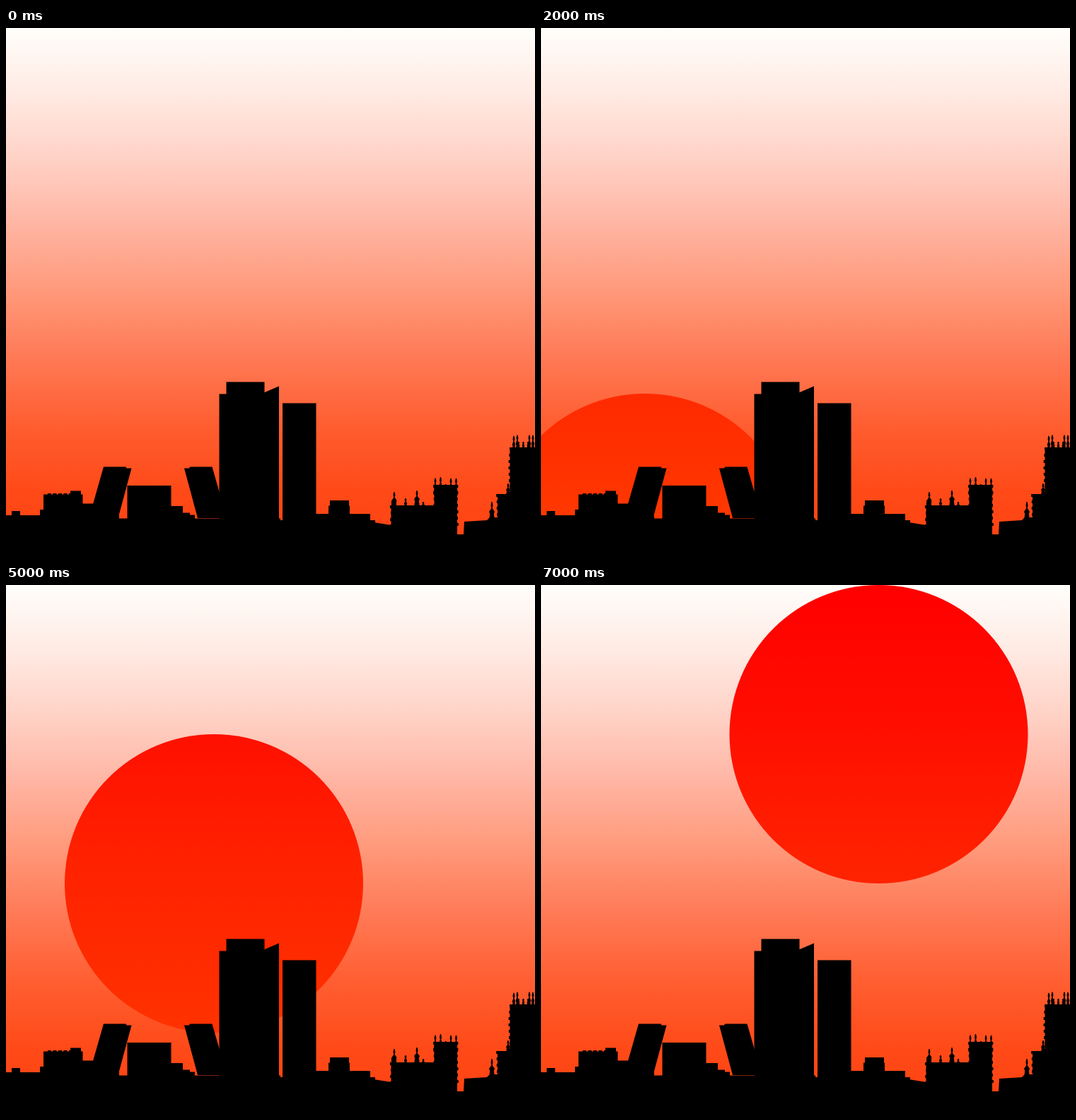
An HTML page with a canvas that plays this animation: 748x748 px, repeating every 8000 ms.

```html
<!DOCTYPE html>
<html lang="en">
<head>
<meta charset="utf-8">
<title>Sunrise over a skyline</title>
<style>
  html, body { margin: 0; height: 100%; overflow: hidden; }
  canvas { display: block; width: 100%; height: 100%; }
</style>
</head>
<body>
<canvas id="stage" width="748" height="748"></canvas>
<script>
  const SIZE = 748, RADIUS = 211;
  const ctx = document.getElementById('stage').getContext('2d');

  // Vertical gradient over the whole stage with evenly spaced colours
  function gradient(...colors) {
    const g = ctx.createLinearGradient(0, 0, 0, SIZE);
    colors.forEach((c, i) => g.addColorStop(i / (colors.length - 1), c));
    return g;
  }
  const sky = gradient('#fffefb', '#ffeae3', '#ffd1c5', '#ffb4a2', '#ff9879',
    '#ff7955', '#ff5e31', '#ff4a18', '#ff4010');
  const glow = gradient('#f00', '#ff0d00', '#ff2000', '#ff2d00', '#ff3c00');

  const noise = n => Math.abs(Math.sin(n * 12.9898) * 43758.5453) % 1;
  const box = (left, top, right, bottom = SIZE) =>
    ctx.fillRect(left, top, right - left, bottom - top);

  function poly(...points) {
    ctx.beginPath();
    points.forEach(p => ctx.lineTo(...p));
    ctx.fill();
  }

  // Tapered pinnacle with a knob near its tip
  function spire(x, top, height, w = 2.2) {
    const shape = [[.6, 0], [1.5, .18], [.7, .32], [w, .5], [w * .7, .6], [w, 1]];
    const side = dir => shape.map(([dx, k]) => [x + dir * dx, top + height * k]);
    poly(...side(1), ...side(-1).reverse());
  }

  // Stone block with small carved ledges along both sides
  function stone(left, top, right, bottom) {
    box(left, top, right, bottom);
    for (let y = top; y < bottom - 8; y += 9) {
      const ledge = 2 * noise(y);
      box(left - ledge, y, right + ledge, y + 4);
    }
  }

  // Four tall pinnacles in two pairs, with low ones between them
  function crown(left, right, top, gap) {
    for (const x of [left, left + gap, right - gap, right]) spire(x, top + noise(x) * 2, 24);
    for (let k = 1; k < 4; k++) spire(left + (right - left) * k / 4, top + 10, 10, 1.8);
  }

  function leaningTower(outer, dir) {
    const at = (dx, y) => [outer + dir * dx, y];
    poly(at(0, 622.5), at(7, 622.5), at(8, 620.5), at(39.5, 620.5), at(54.5, 673), at(54.5, 693), at(19, 693));
  }

  function drawCity() {
    ctx.fillStyle = '#000';

    // Ground and low roofs
    box(0, 689, 160);
    box(158, 693.5, 388);
    box(386, 696, 522);
    poly([520, 699], [545, 703], [545, SIZE], [520, SIZE]);
    box(545, 716, SIZE);
    box(8, 683, 20);
    box(48, 681, 54);
    box(53, 659.5, 108.5);
    for (let x = 59; x < 90; x += 7.5) box(x, 658, x + 5, 660);
    box(91, 654.5, 106);
    box(108, 672.5, 124);

    // Leaning pair with the block between them
    leaningTower(177.5, -1);
    leaningTower(252, 1);
    box(171.5, 647, 233.5);
    box(233, 676, 250);
    box(249, 685.5, 260);
    box(259, 688.5, 267);

    // High-rises
    box(301.5, 517.5, 386);
    box(311.5, 500.5, 365.5);
    poly([365, 515.5], [386, 506.5], [386, 520], [365, 520]);
    box(391, 530.5, 438.5);
    box(438, 687, 515);
    box(456, 675.5, 486);
    box(458, 668, 485);

    // Palace
    stone(544.5, 675, 606, 716);
    box(545, 668, 552);
    spire(549, 656, 24, 3.5);
    spire(565, 665, 14);
    spire(581, 654, 24, 4);
    spire(590, 670, 9);
    stone(605.5, 646, 638, 716);
    crown(607, 636.5, 635, 7.5);
    poly([647, 716], [648, 698], [680, 696], [684, 692], [696, 692], [696, 716]);
    spire(687, 670, 28, 4);
    stone(695, 659, 714, 716);
    spire(710, 644, 18, 3);
    stone(712.5, 593, SIZE, 716);
    crown(718, 745, 575, 5);
  }

  // Sun centres, one held pose per second; the first lies below the stage
  const poses = [[70, 965], [122, 837], [147, 728], [195, 640],
    [243, 517], [294, 422], [386.7, 306], [477.5, 211]];

  function draw() {
    const [x, y] = poses[Math.floor(performance.now() / 1000) % poses.length];
    ctx.fillStyle = sky;
    ctx.fillRect(0, 0, SIZE, SIZE);
    ctx.fillStyle = glow;
    ctx.beginPath();
    ctx.arc(x, y, RADIUS, 0, Math.PI * 2);
    ctx.fill();
    drawCity();
    requestAnimationFrame(draw);
  }
  draw();
</script>
</body>
</html>
```
